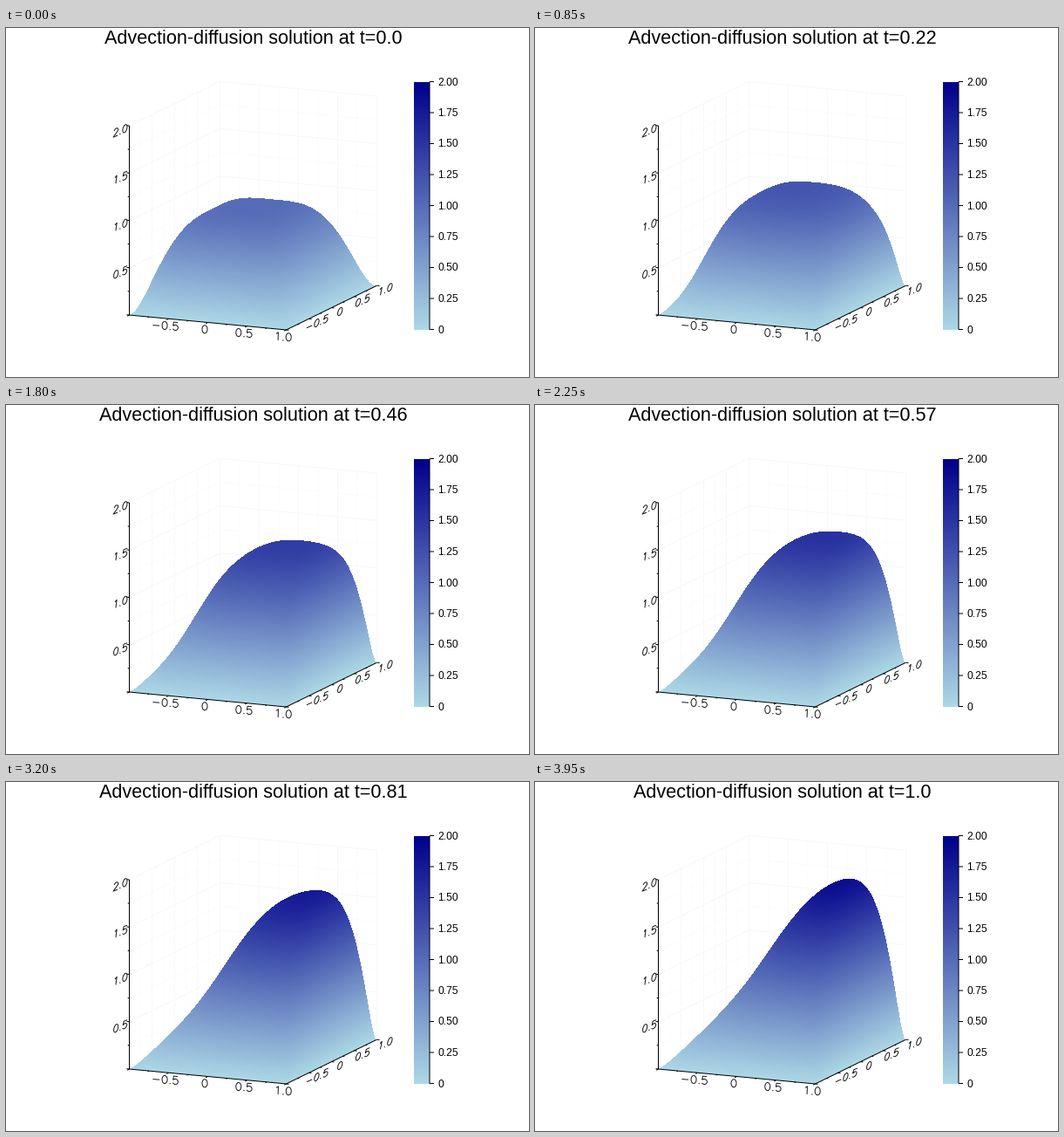
Recreate the animation shown at these times as a matplotlib script. Size 600 px wide and 400 px high, loop 4 s.

```python
import numpy as np
import matplotlib.pyplot as plt
from matplotlib.animation import FuncAnimation
from matplotlib.collections import LineCollection

W, H, DPI = 600, 400, 100
FRAMES, LOOP = 80, 4000
LIGHT, DARK = np.array([173, 216, 230]) / 255, np.array([0, 0, 139]) / 255

# Parallel projection: pixels per unit along each axis, from corner (-1, -1, 0)
ORIGIN = np.array([141.5, 329.0])
EX, EY, EZ = np.array([90, 8.5]), np.array([52, -25.4]), np.array([0, -108.5])


def project(x, y, z):
    return ORIGIN + (x + 1) * EX + (y + 1) * EY + z * EZ


def shade(v):
    v = np.clip(np.asarray(v) / 2, 0, 1)[..., None]
    return LIGHT + v * (DARK - LIGHT)


# Advection-diffusion with unit source and zero boundary values
N, KAPPA, SUB = 101, 0.05, 8
GRID = np.linspace(-1, 1, N)
STEP = GRID[1] - GRID[0]


def rate(u):
    r = np.zeros_like(u)
    mid, left, right = u[1:-1, 1:-1], u[:-2, 1:-1], u[2:, 1:-1]
    lap = (left + right + u[1:-1, :-2] + u[1:-1, 2:] - 4 * mid) / STEP**2
    r[1:-1, 1:-1] = KAPPA * lap - (right - left) / (2 * STEP) + 1
    return r


def solve():
    bump = 1 - GRID**4
    u = np.outer(bump, bump)
    dt = 1 / (FRAMES - 1) / SUB
    states = [u]
    for _ in range(FRAMES - 1):
        for _ in range(SUB):
            a = rate(u)
            b = rate(u + dt / 2 * a)
            c = rate(u + dt / 2 * b)
            d = rate(u + dt * c)
            u = u + dt / 6 * (a + 2 * b + 2 * c + d)
        states.append(u)
    return states


# Sight lines: one per pixel column, sampled from front to back
COLS = np.arange(142, 425)
ROWS = np.arange(90, 350)
K = 300
dx = COLS + 0.5 - ORIGIN[0]
near = np.maximum(0, (dx - 2 * EX[0]) / EY[0])
far = np.minimum(2, dx / EY[0])
SY = near + np.linspace(0, 1, K)[:, None] * (far - near)
SX = np.clip((dx - SY * EY[0]) / EX[0], 0, 2)
FLOOR = -(SX * EX[1] + SY * EY[1])
LEVEL = ORIGIN[1] - (ROWS + 0.5)


def cell(s):
    i = np.clip((s / STEP).astype(int), 0, N - 2)
    return i, s / STEP - i


IX, FX = cell(SX)
IY, FY = cell(SY)


def render(u):
    v = ((1 - FX) * ((1 - FY) * u[IX, IY] + FY * u[IX, IY + 1])
         + FX * ((1 - FY) * u[IX + 1, IY] + FY * u[IX + 1, IY + 1]))
    height = np.maximum.accumulate(FLOOR - EZ[1] * v, axis=0)
    seen = np.full((len(ROWS), len(COLS)), np.nan)
    for c in range(len(COLS)):
        seen[:, c] = np.interp(LEVEL, height[:, c], v[:, c], np.nan, np.nan)
    hit = ~np.isnan(seen)
    img = np.zeros(seen.shape + (4,))
    img[..., :3] = shade(np.nan_to_num(seen))
    img[..., 3] = hit
    return img


def arc(cx, cy, rx, ry, a, b):
    t = np.radians(np.linspace(a, b, 16))
    return [(cx + rx * np.cos(s), cy + ry * np.sin(s)) for s in t]


# Stroke glyphs: advance width and polylines, digit height 1
GLYPHS = {
    "0": (0.9, [arc(0.45, 0.5, 0.33, 0.5, 0, 360)]),
    "1": (0.9, [[(0.25, 0.8), (0.5, 1), (0.5, 0)]]),
    "2": (0.9, [arc(0.44, 0.72, 0.3, 0.28, 170, -35) + [(0.12, 0), (0.8, 0)]]),
    "5": (0.9, [[(0.72, 1), (0.2, 1), (0.15, 0.56)]
                + arc(0.43, 0.33, 0.34, 0.33, 130, -150)]),
    ".": (0.45, [[(0.19, 0.05), (0.27, 0.05)], [(0.23, 0), (0.23, 0.1)]]),
    "-": (1.15, [[(0.12, 0.43), (0.95, 0.43)]]),
}


def label(text, center, base, up):
    base, up = np.array(base), np.array(up)
    pen = -sum(GLYPHS[c][0] for c in text) / 2
    out = []
    for ch in text:
        adv, strokes = GLYPHS[ch]
        out += [[center + (pen + px) * base + (py - 0.5) * up for px, py in s]
                for s in strokes]
        pen += adv
    return out


fig = plt.figure(figsize=(W / DPI, H / DPI), dpi=DPI, facecolor="white")
ax = fig.add_axes([0, 0, 1, 1])
ax.axis("off")


def text(x, y, s, px, **kw):
    return ax.text(x, y, s, fontsize=px * 72 / DPI, family="Liberation Sans",
                   va="baseline", color="black", **kw)


def lines(segs, color, px, z):
    ax.add_collection(LineCollection(segs, colors=color, zorder=z, snap=False,
                                     linewidths=px * 72 / DPI))


# Faint grid on the two back walls, fainter at the quarter steps
major, minor = [], []
for s in np.arange(-1, 1.01, 0.25):
    z = s + 1
    (minor if s % 0.5 else major).extend([
        [project(-1, -1, z), project(-1, 1, z), project(1, 1, z)],
        [project(-1, s, 0), project(-1, s, 2)],
        [project(s, 1, 0), project(s, 1, 2)]])
lines(minor, "0.987", 1, 1)
lines(major, "0.973", 1, 1)

surface = ax.imshow(np.zeros((len(ROWS), len(COLS), 4)), aspect="auto", zorder=2,
                    interpolation="nearest",
                    extent=(COLS[0], COLS[-1] + 1, ROWS[-1] + 1, ROWS[0]))

# Axes, ticks and slanted labels
axes = [[project(-1, -1, 2), project(-1, -1, 0),
         project(1, -1, 0), project(1, 1, 0)]]
for s in np.arange(-1, 1.01, 0.25):
    r = 0.6 if s % 0.5 else 1
    for p, out in ((project(s, -1, 0), (-2.4, 1.2)),
                   (project(1, s, 0), (3, 0.3)),
                   (project(-1, -1, s + 1), (-3, -0.3))):
        axes.append([p, p + r * np.array(out)])
lines(axes, "black", 1, 3)

marks = []
for s, name in ((-0.5, "-0.5"), (0, "0"), (0.5, "0.5"), (1, "1.0")):
    marks += label(name, project(s, -1, 0) + (-3.5, 7.8), (9.2, 0.7), (0.3, -9.2))
    marks += label(name, project(1, s, 0) + (9.7, 4.4), (7.7, -3.4), (1.8, -9))
for z in (0.5, 1, 1.5, 2):
    marks += label(f"{z:.1f}", project(-1, -1, z) + (-10.2, 5.4),
                   (7.6, -3.1), (1.2, -9.2))
lines(marks, "0.1", 1, 4)

# Colour bar
ax.imshow(shade(np.linspace(2, 0, 284))[:, None], aspect="auto", zorder=2,
          interpolation="nearest", extent=(468, 486, 346, 62))
bar = [[(486, 61.5), (486, 345.5)]]
for k in range(9):
    y = 345.5 - k * 35.5
    bar.append([(486, y), (491, y)])
    text(495.5, y + 4, f"{k / 4:.2f}" if k else "0", 12)
lines(bar, "black", 1, 3)

title = text(284, 18, "", 21.6, ha="center")
ax.set_xlim(0, W)
ax.set_ylim(H, 0)

STATES = solve()


def update(i):
    surface.set_data(render(STATES[i]))
    t = round(i / (FRAMES - 1), 2)
    title.set_text(f"Advection-diffusion solution at t={t}")
    return surface, title


anim = FuncAnimation(fig, update, frames=FRAMES, interval=LOOP / FRAMES,
                     repeat=True, repeat_delay=0)
plt.show()
```
